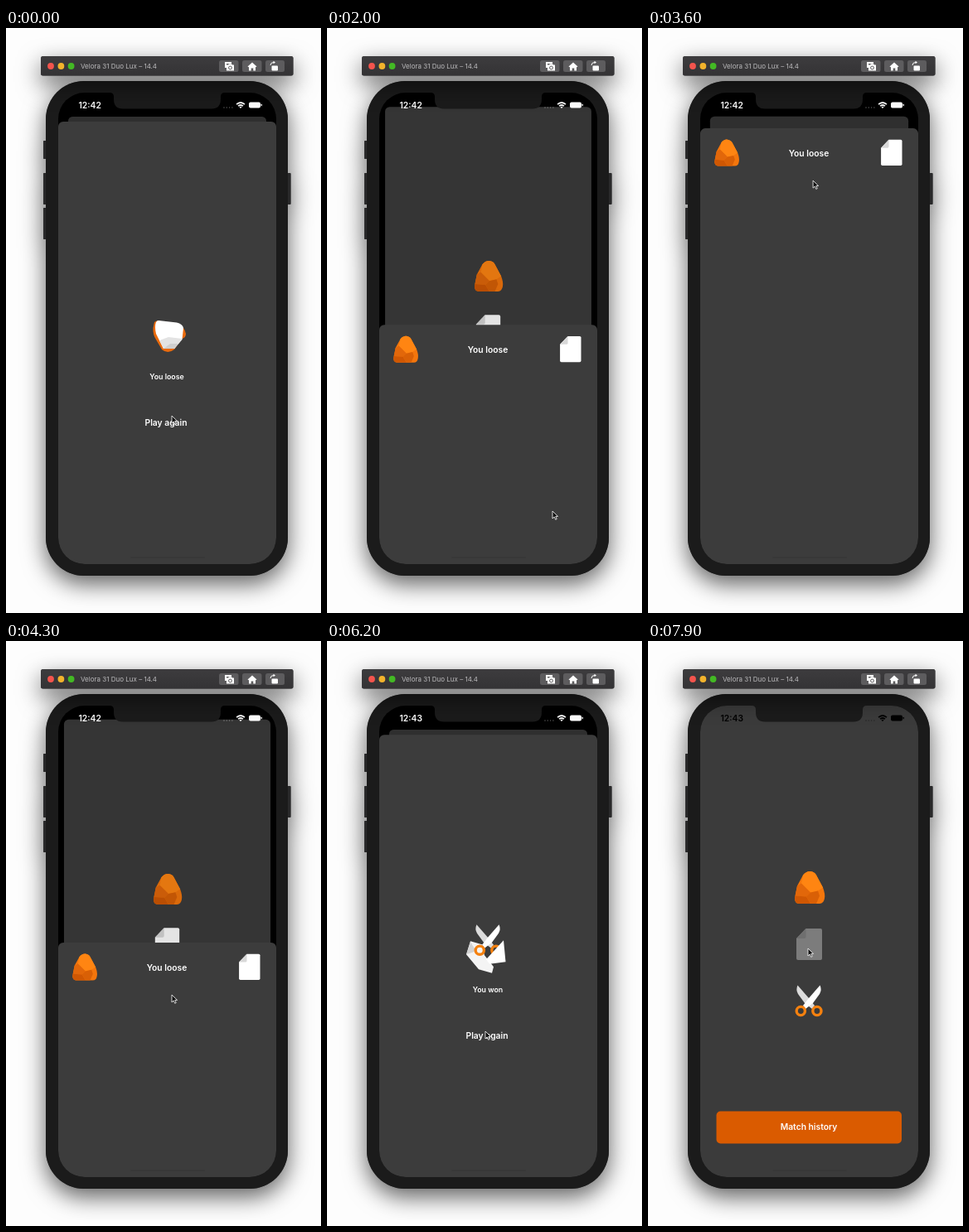
An HTML page for the animation above (8 s loop, 380x706 px).

```html
<!DOCTYPE html>
<html lang="en">
<head>
<meta charset="utf-8">
<style>
html, body { margin: 0; width: 100%; height: 100%; overflow: hidden; background: #fdfdfd; }
svg { display: block; }
text { font: 600 10.3px Inter, sans-serif; fill: #fff; text-anchor: middle; }
.left { text-anchor: start; }
.small { font-size: 8.8px; }
.window { filter: drop-shadow(0 0 .7px rgba(0,0,0,.6)) drop-shadow(0 10px 14px rgba(0,0,0,.62)); }
</style>
</head>
<body>
<svg width="380" height="706" viewBox="0 0 380 706">
  <defs>
    <clipPath id="screen"><rect x="63" y="78" width="263" height="569" rx="32"/></clipPath>
    <linearGradient id="barFill" x2="0" y2="1"><stop stop-color="#3d3c3e"/><stop offset="1" stop-color="#343335"/></linearGradient>
    <g id="rock">
      <path fill="#f4760c" d="M-8-15Q-4-20 1-19.500Q6-19 8-15L16 0Q19 8 18 13Q17 19.500 12 19.500H-13Q-18 19-18 13L-15-2Z"/>
      <path fill="#ff8512" d="M-8-15Q-4-20 1-19.500Q6-19 8-15L16 0 10 4 1 6-10-5Z"/>
      <path fill="#e2670a" d="M-15-2L-10-5 1 6-4 11-17.500 10Z"/>
      <path fill="#cf5703" d="M-17.500 10L-4 11 1 19.500H-13Q-18 19-18 13Z"/>
      <path fill="#d96006" d="M-4 11L1 6 10 4 12 10 8 19.500H1Z"/>
    </g>
    <g id="paper">
      <path fill="#fff" d="M-4-19H13.500Q15.500-19 15.500-17V17Q15.500 19 13.500 19H-13.500Q-15.500 19-15.500 17V-7Z"/>
      <path fill="#d8d8d8" d="M-4-19V-9Q-4-7-6-7H-15.500Z"/>
    </g>
    <g id="scissors">
      <path fill="#dcdcdc" d="M-13.500-18.500Q-16-13-13-8L-5 3 4 10 7 6 0-3Z"/>
      <path fill="#fff" d="M13.500-18.500Q16-13 13-8L5 3-4 10-7 6 0-3Z"/>
      <g fill="none" stroke="#f5810f" stroke-width="3.400"><circle cx="-9.700" cy="12.500" r="5.100"/><circle cx="9.900" cy="12.500" r="5.100"/></g>
    </g>
  </defs>

  <g class="window">
    <g fill="#29292a">
      <rect x="45" y="136" width="5" height="22" rx="1"/><rect x="45" y="175" width="5" height="38" rx="1"/>
      <rect x="45" y="217" width="5" height="38" rx="1"/><rect x="338" y="175" width="5.500" height="38" rx="1"/>
    </g>
    <rect x="48" y="64" width="292" height="597" rx="46" fill="#1b1b1b"/>
  </g>

  <g clip-path="url(#screen)">
    <rect x="63" y="78" width="263" height="569"/>
    <g id="card">
      <rect id="cardBack" x="63" y="78" width="263" height="569" fill="#3b3b3b"/>
      <g id="cardContent">
        <use href="#rock" x="195" y="297.500"/>
        <use id="paperChoice" href="#paper" x="194.500" y="366"/>
        <use id="scissorsChoice" href="#scissors" x="194" y="434"/>
        <g id="historyButton">
          <rect x="82.500" y="567.500" width="223.500" height="39" rx="5" fill="#da5b00"/>
          <text x="194" y="590.500">Match history</text>
        </g>
      </g>
      <rect id="dim" x="63" y="78" width="263" height="569"/>
    </g>

    <g id="sheet">
      <rect x="63" y="113" width="263" height="560" rx="6" fill="#3c3c3c"/>
      <g id="lose">
        <path fill="#e9690b" d="M179 355Q182 352 187 354L208 358Q215 360 217 369Q217 374 212 375L203 388Q195 394 188 388L181 376Q177 370 177.500 362Z"/>
        <path fill="#fff" d="M184 353L206 355.500Q213 357 214 362L212.500 376 203 387H190L181 369Q179 360 181 355Q182 353 184 353Z"/>
        <path fill="#e3e3e3" d="M185 377L196 373 212.500 375 203 387H190Z"/>
        <path fill="#cfcfcf" d="M190 387L198 381 208 381 203 387Z"/>
        <text class="small" x="194" y="424">You loose</text>
      </g>
      <g id="win">
        <path fill="#f4f4f4" d="M173 362L187 366 190 379 201 393 199 400.500 183 396 168 378Z"/>
        <path fill="#d2d2d2" d="M173 363L180 374 168 378Z"/>
        <use href="#scissors" x="194" y="360.500"/>
        <path fill="#fff" d="M213 361L215.500 387 196 389.500 192 384Z"/>
        <text class="small" x="194" y="424">You won</text>
      </g>
      <text id="again" x="193" y="479.500">Play again</text>
      <g id="history">
        <use href="#rock" transform="translate(95 142.500) scale(.82)"/>
        <use href="#paper" transform="translate(293.800 142.300) scale(.82)"/>
        <text x="194" y="146.500">You loose</text>
      </g>
    </g>
    <rect x="150" y="638" width="90" height="2" rx="1" fill="#383838"/>

    <g id="status">
      <text id="clock" class="left" x="87.500" y="96.500" style="fill:inherit"></text>
      <g opacity=".32"><circle cx="263" cy="96" r=".8"/><circle cx="266.300" cy="96" r=".8"/><circle cx="269.600" cy="96" r=".8"/><circle cx="272.900" cy="96" r=".8"/></g>
      <path d="M277.500 91.500Q283 86.500 288.500 91.500L287.300 92.800Q283 89 278.700 92.800ZM279.500 93.500Q283 90.500 286.500 93.500L285.300 94.800Q283 93 280.700 94.800ZM281.500 95.500Q283 94.200 284.500 95.500L283 97Z"/>
      <rect x="293" y="89.500" width="14" height="7" rx="2"/><rect x="307.600" y="91.700" width="1.200" height="2.600" rx=".6"/>
    </g>
  </g>
  <path fill="#1b1b1b" d="M125 77V78Q130 78 130 83V86Q130 97.500 141 97.500H248Q259 97.500 259 86V83Q259 78 264 78V77Z"/>

  <g class="window">
    <rect x="42" y="34" width="304.500" height="23.500" rx="2.500" fill="url(#barFill)"/>
  </g>
  <circle cx="54" cy="46" r="3.900" fill="#f4544d"/><circle cx="66.400" cy="46" r="3.900" fill="#f2b32c"/><circle cx="78.600" cy="46" r="3.900" fill="#43b924"/>
  <text class="left" x="90" y="49" style="font-size:8px;font-weight:400;fill:#bcbbbd">Velora 31 Duo Lux – 14.4</text>
  <g fill="#5d5c5e"><rect x="257" y="39" width="23.500" height="14" rx="2.500"/><rect x="285" y="39" width="23.500" height="14" rx="2.500"/><rect x="313" y="39" width="23" height="14" rx="2.500"/></g>
  <g fill="#fff">
    <path d="M264 41H272V43H266V48H264Z"/>
    <path d="M266 44.500H268L269 43.300H272L273 44.500H275V51.500H266Z"/><circle cx="270.500" cy="48" r="1.900" fill="none" stroke="#5d5c5e"/>
    <path d="M291.500 46.500L297 41.500 302.500 46.500 301.700 47.300 301 46.700V51.500H298.300V48.500H295.700V51.500H293V46.700L292.300 47.300Z"/>
    <rect x="320.500" y="45.500" width="7.500" height="6" rx="1"/>
    <path d="M319 45Q319 41.500 323 41.500" fill="none" stroke="#fff"/><path d="M322.500 39.800L325 41.500 322.500 43.200Z"/>
  </g>

  <path id="cursor" d="M0 0V9L2.200 7 3.700 10.300 5.200 9.600 3.800 6.400H6.600Z" fill="#111" stroke="#fff" stroke-width=".8" stroke-linejoin="round"/>
</svg>
<script>
const el = id => document.getElementById(id);
const set = (id, name, value) => el(id).setAttribute(name, value);
const LOOP = 8000, TOP = 113, TRAVEL = 534, GRAB = 63;

// Pointer stops: time, x, y
const stops = [
  [0, 200, 468], [350, 200, 468], [950, 205, 443], [1080, 205, 443], [1700, 272, 583],
  [2400, 272, 583], [2700, 250, 488], [3300, 199, 162], [3450, 199, 162], [4300, 200, 427],
  [4500, 200, 427], [5000, 198, 445], [5350, 198, 445], [6000, 191, 471], [6200, 191, 471],
  [6300, 190, 471], [6600, 190, 471], [7300, 294, 556], [7800, 193, 371], [8000, 193, 371]
];

function pointer(t) {
  const i = Math.max(1, stops.findIndex(s => s[0] > t));
  const [t0, x0, y0] = stops[i - 1], [t1, x1, y1] = stops[i];
  const u = (t - t0) / (t1 - t0), e = u * u * (3 - 2 * u);
  return [x0 + (x1 - x0) * e, y0 + (y1 - y0) * e];
}

// Critically damped spring from 1 to 0
function settle(ms) {
  const x = Math.max(0, ms) * 0.012;
  return (1 + x) * Math.exp(-x);
}

const dragged = y => 1 - Math.max(0, y - GRAB - TOP) / TRAVEL;

// How far the sheet is open, 0 to 1
function openness(t) {
  if (t < 1500) return settle(t - 200);
  if (t < 3400) return 1 - settle(t - 1850);
  if (t < 4400) return dragged(pointer(t)[1]);
  if (t < 5300) return dragged(427) * settle(t - 4400);
  if (t < 6400) return 1 - settle(t - 5350);
  return settle(t - 6600);
}

function pressed(t, from, to) {
  if (t < from) return 1;
  return 0.33 + 0.67 * Math.min(1, Math.max(0, t - to) / 200);
}

function draw(t) {
  const p = openness(t), [x, y] = pointer(t);
  const recede = 1 - (1 - p) ** 1.15;
  const show = (id, on) => set(id, "display", on ? "inline" : "none");
  set("cursor", "transform", `translate(${x} ${y})`);
  set("sheet", "transform", `translate(0 ${TRAVEL * (1 - p)})`);
  show("sheet", p > 0.001);
  set("card", "transform", `translate(194.5 ${78 + 29 * recede}) scale(${1 - 0.091 * recede}) translate(-194.5 -78)`);
  for (const id of ["cardBack", "dim"]) set(id, "rx", 6 * Math.min(1, p * 4));
  set("cardContent", "transform", `translate(0 ${-6 * recede})`);
  set("dim", "opacity", 0.2 * p);

  const isHistory = t > 1200 && t < 5200;
  show("lose", t <= 1200);
  show("history", isHistory);
  show("win", t >= 5200);
  show("again", !isHistory);
  set("again", "opacity", t < 1200 ? pressed(t, 80, 200) : pressed(t, 6450, 6580));
  set("historyButton", "opacity", pressed(t, 1750, 1850));
  set("scissorsChoice", "opacity", pressed(t, 5150, 5320));
  set("paperChoice", "opacity", pressed(t, 7850, LOOP));

  const light = Math.round(255 * Math.min(1, p * 2));
  set("status", "fill", `rgb(${light},${light},${light})`);
  el("clock").textContent = t < 4600 ? "12:42" : "12:43";
}

const start = performance.now();
function frame() {
  draw((performance.now() - start) % LOOP);
  requestAnimationFrame(frame);
}
frame();
</script>
</body>
</html>
```
